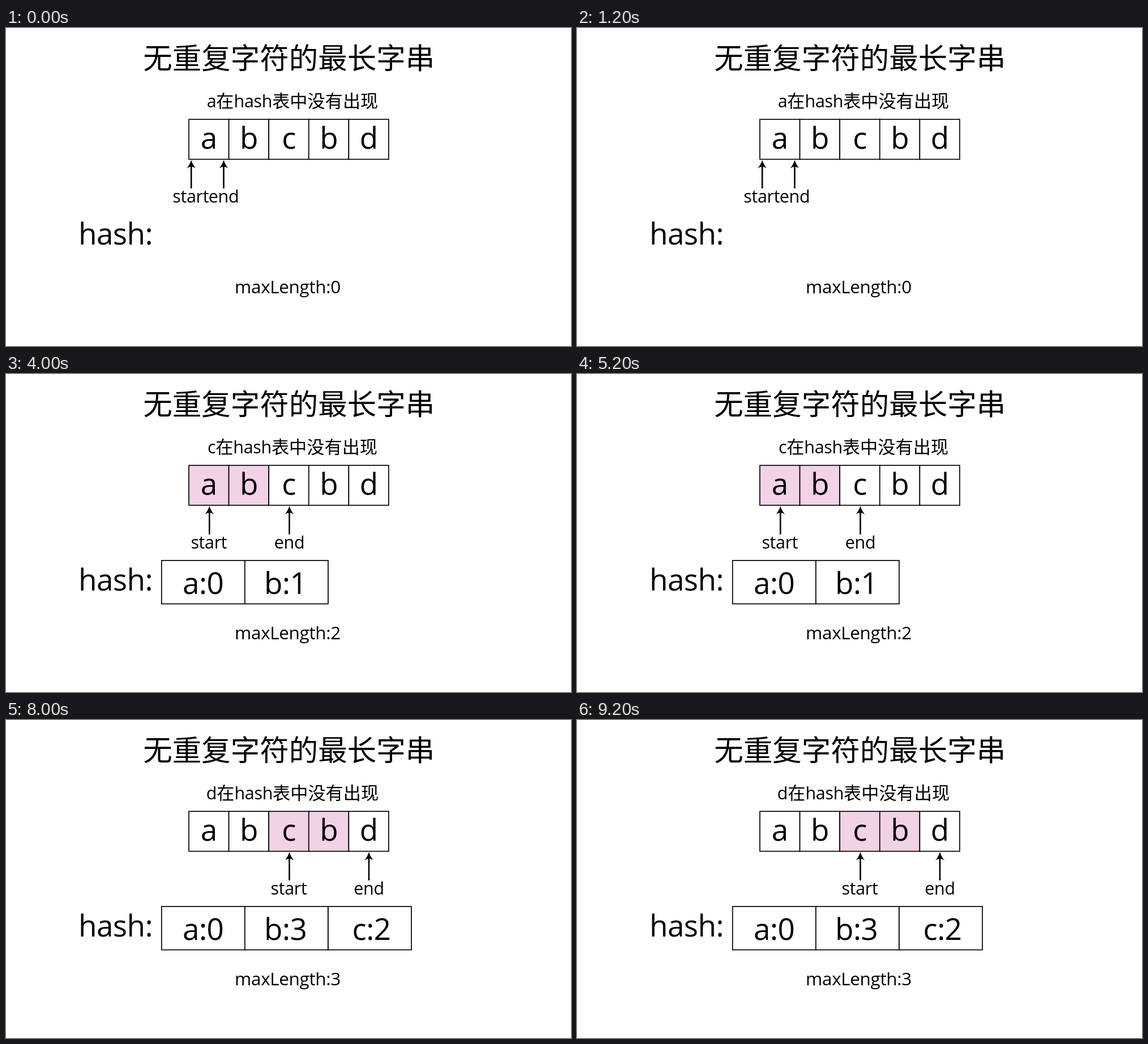
An HTML page with a canvas for the animation above (10000 ms loop, 998 by 561 pixels).

```html
<!DOCTYPE html>
<html lang="zh-CN">
<head>
<meta charset="utf-8">
<title>无重复字符的最长字串</title>
<style>
html, body { margin: 0; width: 100%; height: 100%; overflow: hidden; background: #fff; }
canvas { display: block; }
</style>
</head>
<body>
<canvas id="stage" width="998" height="561"></canvas>
<script>
const ctx = document.getElementById('stage').getContext('2d');
const LATIN = '"Open Sans", "Noto Sans", sans-serif';
const HAN = '"Noto Sans CJK SC", "Noto Sans CJK", sans-serif';
const TRACKING = -0.011; // em, Latin only
const STEP = 2000;
const CELL = { x: 323, y: 161.2, size: 70.6 };
const SLOT = { x: 274.8, y: 329, w: 147.1, h: 76.5 };
const SLOT_TEXT = [312, 456, 611.5];
const ABSENT = '在hash表中没有出现';

// start, end: arrow positions; lit: highlighted cells [from, to)
const steps = [
  { note: 'a' + ABSENT, start: 327.2, end: 384.5, lit: [0, 0], hash: [], max: 0 },
  { note: 'b' + ABSENT, start: 359.3, end: 429.5, lit: [0, 1], hash: ['a:0'], max: 1 },
  { note: 'c' + ABSENT, start: 359.3, end: 500.5, lit: [0, 2], hash: ['a:0', 'b:1'], max: 2 },
  { note: 'b在hash表中且index大于等于start，修改start值为出现位置之后的位置',
    start: 359.3, end: 572.2, lit: [0, 3], hash: ['a:0', 'b:1', 'c:2'], max: 3 },
  { note: 'd' + ABSENT, start: 500.5, end: 641, lit: [2, 4], hash: ['a:0', 'b:3', 'c:2'], max: 3 }
];

function setFont(size, family) {
  ctx.font = `${size}px ${family}`;
  ctx.letterSpacing = (family === LATIN ? TRACKING * size : 0) + 'px';
}

function text(str, x, y, size, align = 'left', family = LATIN) {
  setFont(size, family);
  ctx.textAlign = align;
  ctx.fillStyle = '#000';
  ctx.fillText(str, x, y);
}

function box(x, y, w, h, fill) {
  ctx.fillStyle = fill;
  ctx.fillRect(x, y, w, h);
  ctx.strokeStyle = '#000';
  ctx.lineWidth = 1.7;
  ctx.strokeRect(x, y, w, h);
}

// Centres a line that mixes Latin and Chinese runs.
function note(str, cx, y) {
  const runs = str.match(/[a-z]+|[^a-z]+/g).map(s => {
    const latin = /[a-z]/.test(s);
    const size = latin ? 30.5 : 31.2, family = latin ? LATIN : HAN;
    setFont(size, family);
    return { s, size, family, w: ctx.measureText(s).width };
  });
  let x = cx - runs.reduce((sum, r) => sum + r.w, 0) / 2;
  for (const r of runs) {
    text(r.s, x, y, r.size, 'left', r.family);
    x += r.w;
  }
}

function arrow(x, label, labelX) {
  ctx.fillStyle = '#000';
  ctx.fillRect(x - 1.3, 242, 2.6, 41);
  ctx.beginPath();
  ctx.moveTo(x, 233);
  ctx.quadraticCurveTo(x + 3, 242, x + 8, 247.5);
  ctx.quadraticCurveTo(x + 4, 245, x, 244.5);
  ctx.quadraticCurveTo(x - 4, 245, x - 8, 247.5);
  ctx.quadraticCurveTo(x - 3, 242, x, 233);
  ctx.fill();
  text(label, labelX, 308, 30.5, 'center');
}

function draw(step) {
  ctx.fillStyle = '#fff';
  ctx.fillRect(0, 0, 998, 561);

  text('无重复字符的最长字串', 499.7, 71.5, 51.5, 'center', HAN);
  note(step.note, 506, 140);

  [...'abcbd'].forEach((ch, i) => {
    const x = CELL.x + i * CELL.size;
    const lit = i >= step.lit[0] && i < step.lit[1];
    box(x, CELL.y, CELL.size, 70.4, lit ? '#f2d2e7' : '#fff');
    text(ch, x + CELL.size / 2, 213, 53, 'center');
  });

  arrow(step.start, 'start', step.start - 1);
  arrow(step.end, 'end', step.end);

  text('hash:', 128, 381.5, 53);
  step.hash.forEach((entry, i) => {
    box(SLOT.x + i * SLOT.w, SLOT.y, SLOT.w, SLOT.h, '#fff');
    text(entry, SLOT_TEXT[i], 388, 53);
  });

  text('maxLength:' + step.max, 404, 467.5, 31.5);
}

const begin = performance.now();
function tick() {
  const t = performance.now() - begin;
  draw(steps[Math.floor(t / STEP) % steps.length]);
  requestAnimationFrame(tick);
}
tick();
</script>
</body>
</html>
```
